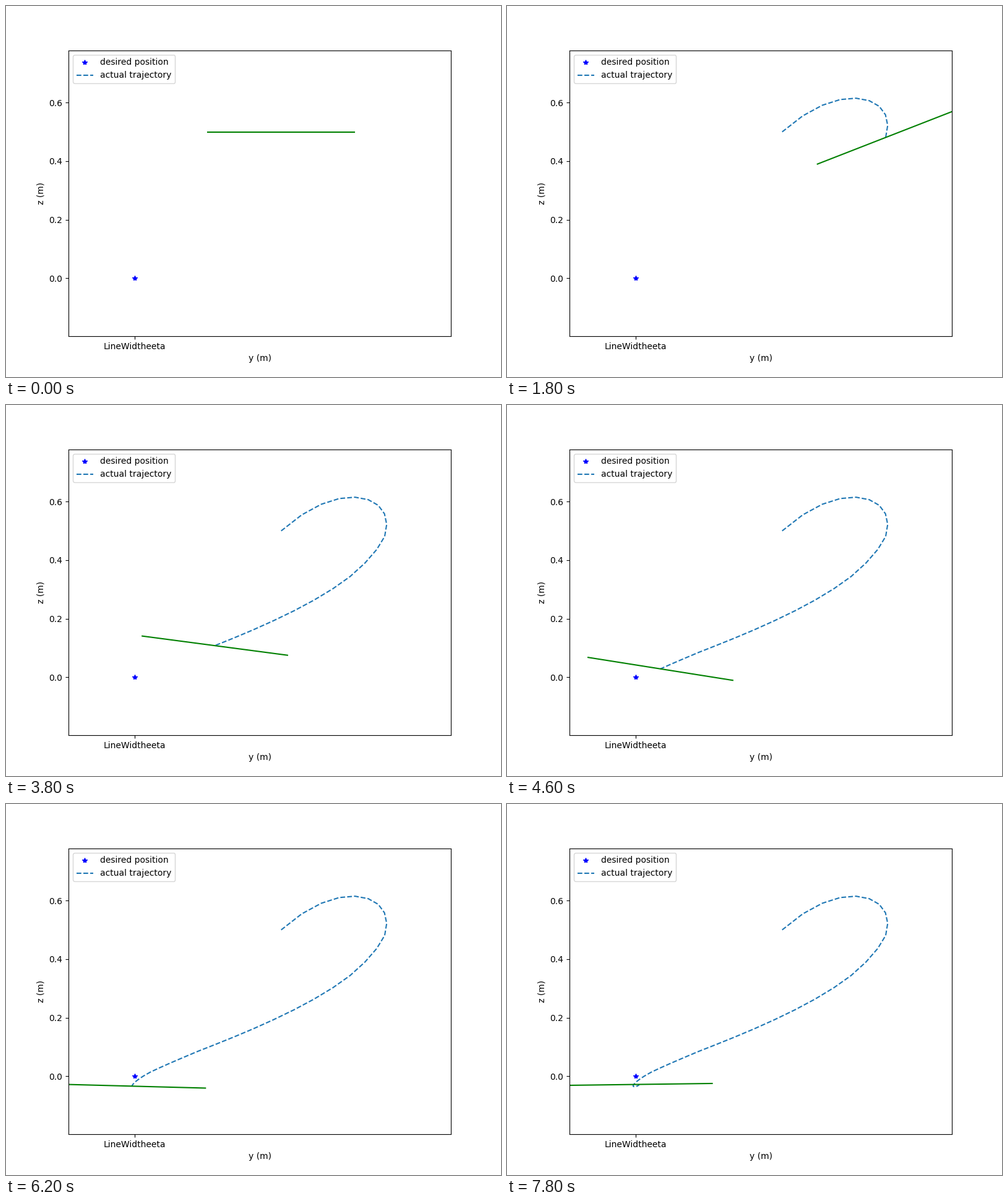
Recreate the animation shown at these times as a matplotlib script. Size 800 by 600 pixels, loop 8 s.

```python
import numpy as np
import matplotlib.pyplot as plt
from matplotlib.animation import FuncAnimation

FRAMES, INTERVAL = 40, 200
WIDTH, HEIGHT = 800, 600
LEFT, RIGHT, TOP, BOTTOM = 101, 719, 72, 534
ORIGIN = (207.8, 440.2)
UNIT = 473.5          # pixels per metre
ARM = 0.25 * UNIT     # half length of the vehicle

# Key poses: step, x, y, roll (positive tips the right end down)
KEYS = np.array([
    (0, 444.7, 203.6, 0),
    (3, 538.5, 151.3, -.25),
    (6, 601.7, 162.3, -.40),
    (9, 612, 212.6, -.372),
    (12, 556, 277.5, -.211),
    (16, 432, 349, .03),
    (20, 309.5, 400.2, .15),
    (24, 233.5, 433.5, .148),
    (28, 207.2, 451.2, .075),
    (32, 204.7, 456.9, .013),
    (39, 213.2, 453.5, -.013),
])


def pose(t):
    """Value at t of the cubic through the four nearest key poses."""
    k = np.clip(np.searchsorted(KEYS[:, 0], t) - 2, 0, len(KEYS) - 4)
    near = KEYS[k:k + 4]
    return np.polyfit(near[:, 0] - t, near[:, 1:], 3)[-1]


xs, ys, roll = np.array([pose(t) for t in range(FRAMES)]).T

plt.rcParams["font.family"] = "DejaVu Sans"
fig = plt.figure(figsize=(WIDTH / 100, HEIGHT / 100), dpi=100)
ax = fig.add_axes([LEFT / WIDTH, 1 - BOTTOM / HEIGHT,
                   (RIGHT - LEFT) / WIDTH, (BOTTOM - TOP) / HEIGHT])
ax.set_xlim(LEFT, RIGHT)
ax.set_ylim(BOTTOM, TOP)
heights = 0.2 * np.arange(4)
ax.set_xticks([ORIGIN[0]], ["LineWidtheeta"])
ax.set_yticks(ORIGIN[1] - heights * UNIT, [f"{h:.1f}" for h in heights])
ax.set_xlabel("y (m)")
ax.set_ylabel("z (m)")

ax.plot(*ORIGIN, "b*", label="desired position")
trail, = ax.plot([], [], "--", color="C0", label="actual trajectory")
body, = ax.plot([], [], color="green")
ax.legend(loc="upper left")


def update(i):
    trail.set_data(xs[:i + 1], ys[:i + 1])
    dx, dy = ARM * np.cos(roll[i]), ARM * np.sin(roll[i])
    body.set_data([xs[i] - dx, xs[i] + dx], [ys[i] - dy, ys[i] + dy])
    return trail, body


anim = FuncAnimation(fig, update, frames=FRAMES, interval=INTERVAL,
                     init_func=lambda: update(0), repeat=True, repeat_delay=0)
plt.show()
```
